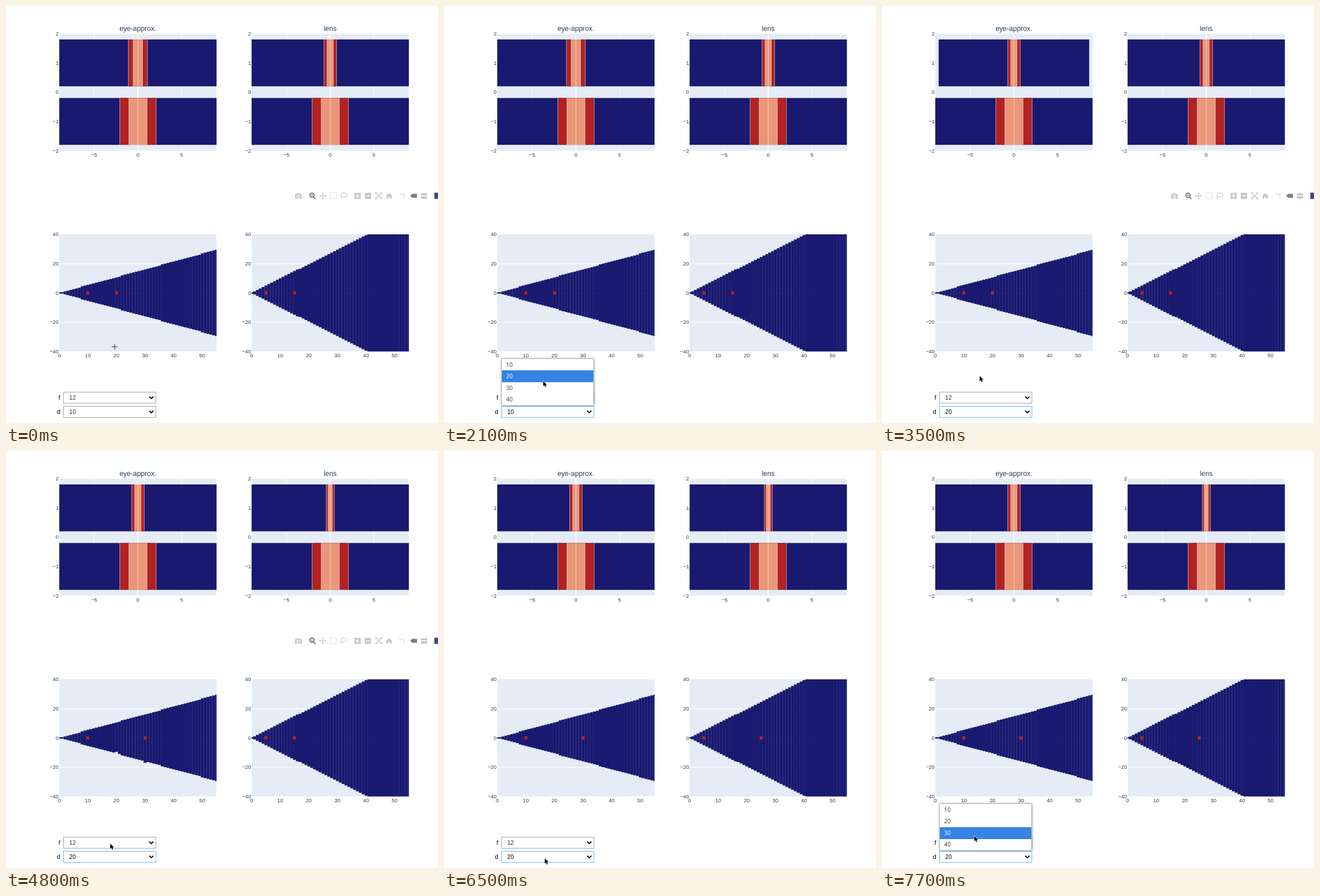
Write an HTML page with a canvas that moves like this. It is 761 by 736 pixels and loops after 8 s.

```html
<!DOCTYPE html>
<html lang="en">
<head>
<meta charset="utf-8">
<title>Eye and lens</title>
<style>
html, body { margin: 0; width: 100%; height: 100%; overflow: hidden; background: #fff; }
canvas { display: block; }
</style>
</head>
<body>
<canvas id="stage" width="761" height="736"></canvas>
<script>
const LOOP = 8000, STEP = 100;
const NAVY = '#191970', RED = '#b22222', SALMON = '#e9967a', PALE = '#e5ecf6', INK = '#2a3f5f';
const LIGHT = '#c7c7c7', DARK = '#7c7c7c', SEAM = 'rgba(229,236,246,.06)';
const LEFT = 93.8, RIGHT = 432.6, PLOT_W = 277.1, PLOT_H = 206.7;
const LIST_TOP = 623, ROW_H = 20.4;
const c = document.getElementById('stage').getContext('2d');

// Pointer stops: time, x, y
const stops = [
  [0, 191.5, 601.5], [900, 194.5, 724], [1700, 194.5, 724], [2500, 172, 653], [3900, 172, 653],
  [4800, 183.5, 693], [5300, 186, 724], [6500, 177.5, 719], [7000, 177.5, 719], [7700, 162.5, 679.5]
];
const menus = [{ open: 1500, hover: 2000, close: 3100 }, { open: 6600, hover: 7500, close: LOOP }];

const within = (t, a, b) => t >= a && t < b;
const clamp = (v, lo, hi) => Math.min(hi, Math.max(lo, v));
const ramp = (t, start) => clamp((t - start) / 300, 0, 1);
const tick = n => String(n).replace('-', '\u2212');

function pointerAt(t) {
  const i = stops.findIndex(s => s[0] > t);
  if (i < 0) return stops[stops.length - 1].slice(1);
  const [t0, x0, y0] = stops[i - 1], [t1, x1, y1] = stops[i];
  const p = 1 - (1 - (t - t0) / (t1 - t0)) ** 3;
  return [x0 + (x1 - x0) * p, y0 + (y1 - y0) * p];
}

function rect(x, y, w, h, color) {
  c.fillStyle = color;
  c.fillRect(x, y, w, h);
}

function frame(x, y, w, h, color) {
  c.strokeStyle = color;
  c.lineWidth = 1;
  c.strokeRect(x, y, w, h);
}

function text(s, x, y, align = 'center', size = 9.4, color = INK, font = 'Liberation Sans') {
  c.font = `${size}px "${font}", sans-serif`;
  c.textAlign = align;
  c.fillStyle = color;
  c.fillText(s, x, y);
}

function trace(points) {
  c.beginPath();
  points.forEach(p => c.lineTo(...p));
}

function line(points, color, width = 1.2) {
  trace(points);
  c.strokeStyle = color;
  c.lineWidth = width;
  c.stroke();
}

function shape(points, color) {
  trace(points);
  c.fillStyle = color;
  c.fill();
}

function ring(x, y, rx, ry, color, width = 1.2) {
  c.beginPath();
  c.ellipse(x, y, rx, ry, 0, 0, 7);
  c.strokeStyle = color;
  c.lineWidth = width;
  c.stroke();
}

function clipped(x, y, paint) {
  c.save();
  c.beginPath();
  c.rect(x, y, PLOT_W, PLOT_H);
  c.clip();
  rect(x, y, PLOT_W, PLOT_H, PALE);
  paint();
  c.restore();
}

// Two nested bars; red and dark are half-widths of the upper one
function barPlot(x, title, red, dark) {
  const top = 48.7, unit = PLOT_W / 18, mid = x + PLOT_W / 2, vUnit = PLOT_H / 4;
  const bar = (v, red, dark) => {
    const y = top + v * vUnit, h = 1.6 * vUnit;
    [[dark, NAVY], [red, RED], [red / 2, SALMON]].forEach(([w, color]) => {
      rect(mid - w * unit, y, 2 * w * unit, h, color);
      [-w, w].forEach(e => rect(mid + e * unit - .3, y, .6, h, PALE));
    });
    rect(mid - .4, y, .8, h, '#f6e6e4');
  };
  clipped(x, top, () => {
    [-5, 0, 5].forEach(v => rect(mid + v * unit - (v ? .5 : 1), top, v ? 1 : 2, PLOT_H, '#fff'));
    bar(.2, red, dark);
    bar(2.2, 2.08, 20);
  });
  text(title, mid, 44, 'center', 12.3);
  [-5, 0, 5].forEach(v => text(tick(v), mid + v * unit, 266));
  for (let v = -2; v <= 2; v++) text(tick(v), x - 1, top + (2 - v) * vUnit + 3.3, 'right');
}

// Cone of stacked cells with two marked columns; while moving, the lower ends lag behind
function conePlot(x, slope, marks, moving) {
  const top = 403, unit = PLOT_W / 55, vUnit = PLOT_H / 80, mid = top + PLOT_H / 2;
  clipped(x, top, () => {
    [-20, 20].forEach(v => rect(x, Math.round(mid - v * vUnit) - .5, PLOT_W, 1.2, '#fff'));
    rect(x, mid - 1, PLOT_W, 2, '#fff');
    for (let i = 0; i <= 55; i++) {
      const half = Math.max(1, Math.round(2 * slope * i)) / 2;
      const lag = moving ? (i === marks[1]) - (i === marks[1] - 10) : 0;
      const cx = x + (i - .5) * unit, y = mid - half * vUnit, h = (2 * half + lag) * vUnit;
      rect(cx, y, unit + .3, h, NAVY);
      rect(cx, y, .5, h, SEAM);
    }
    rect(x, mid - .3, PLOT_W, .6, SEAM);
    marks.forEach(m => rect(x + (m - .5) * unit, mid - 3, unit, 6, RED));
  });
  for (let v = 0; v <= 50; v += 10) text(v, x + v * unit, 620);
  for (let v = -40; v <= 40; v += 20) text(tick(v), x - 1, mid - v * vUnit + 3.3, 'right');
}

// Runs paint around (x, 335), turned in quarter steps
function icon(x, paint, turns = 1) {
  for (let i = 0; i < turns; i++) {
    c.save();
    c.translate(x, 335);
    c.rotate(i * Math.PI / 2);
    paint();
    c.restore();
  }
}

function toolbar(alpha) {
  if (alpha <= 0) return;
  c.globalAlpha = alpha;
  icon(515, () => {
    rect(-6, -3, 12, 8, LIGHT);
    rect(-3, -4.5, 6, 2, LIGHT);
    ring(0, 1, 2.3, 2.3, '#fff');
  });
  icon(539, () => {
    ring(0, -1, 3.8, 3.8, DARK, 2);
    line([[2.5, 2], [6, 5.5]], DARK, 2.2);
    rect(-2, -1.5, 4, 1, DARK);
    rect(-.5, -3, 1, 4, DARK);
  });
  icon(558, () => {
    line([[0, 0], [5, 0]], LIGHT);
    shape([[6.3, 0], [4, 2.2], [4, -2.2]], LIGHT);
  }, 4);
  c.setLineDash([2, 1.3]);
  icon(576.3, () => frame(-5.5, -5.2, 11, 10.5, LIGHT));
  icon(698, () => line([[-5, -3], [3, -3], [3, 5]], LIGHT, 1.5));
  c.setLineDash([]);
  icon(595, () => {
    ring(0, -1.5, 5.4, 3.6, LIGHT);
    line([[-4, 1], [-4.8, 3.5], [-3, 5.5]], LIGHT);
  });
  [619.3, 637.6].forEach((x, i) => icon(x, () => {
    rect(-5.5, -5.2, 11, 10.8, LIGHT);
    rect(-3.3, -.6, 6.6, 1.6, '#fff');
    if (!i) rect(-.8, -3.1, 1.6, 6.6, '#fff');
  }));
  icon(656.5, () => {
    line([[0, 0], [5, 5]], LIGHT);
    line([[2.4, 5.4], [5.4, 5.4], [5.4, 2.4]], LIGHT);
  }, 4);
  icon(675, () => {
    shape([[-6, .5], [0, -5], [6, .5]], LIGHT);
    [-4.5, 1.4].forEach(x => rect(x, 0, 3.1, 5, LIGHT));
    rect(-2, 0, 4, 2, LIGHT);
  });
  icon(718, () => shape([[-6, 0], [-2.5, -3.6], [6, -3.6], [6, 3.6], [-2.5, 3.6]], DARK));
  [-4.5, 1].forEach(y => icon(736, () => shape([[-6, y + 2], [-4, y], [6, y], [6, y + 4], [-4, y + 4]], LIGHT)));
  rect(754.5, 329.5, 11, 11, '#3b4b78');
  c.globalAlpha = 1;
}

function select(label, y, value, focus) {
  text(label, 95.5, y + 14, 'right', 11, '#000');
  frame(101.5, y + .5, 162.5, 19.7, focus ? '#64b5f6' : '#9e9e9e');
  text(value, 111.5, y + 14, 'left', 10.2, focus ? '#000' : '#333');
  line([[252.3, y + 8.3], [256, y + 12], [259.7, y + 8.3]], '#000', 1.9);
}

function list(row) {
  c.save();
  c.shadowColor = 'rgba(0,0,0,.6)';
  c.shadowBlur = 5;
  rect(101.5, LIST_TOP - .5, 162, 82.5, '#fff');
  c.restore();
  frame(101.5, LIST_TOP - .5, 162, 82.5, '#b4b4b4');
  for (let i = 0; i < 4; i++) {
    const y = Math.round(LIST_TOP + i * ROW_H);
    if (i === row) rect(102, y, 161, 21, '#3584e4');
    text((i + 1) * 10, 109.6, y + 14, 'left', 10, i === row ? '#fff' : '#333', 'Open Sans');
  }
}

function pointer(x, y) {
  if (y < 609) {
    line([[x - 5.5, y], [x + 5.5, y]], '#333', 1);
    line([[x, y - 5.5], [x, y + 5.5]], '#333', 1);
    return;
  }
  c.save();
  c.translate(x, y);
  c.lineJoin = 'round';
  trace([[0, 0], [0, 9.2], [2.1, 7.3], [3.7, 10.7], [5.3, 10], [3.8, 6.7], [6.7, 6.5]]);
  c.closePath();
  c.strokeStyle = '#fff';
  c.lineWidth = 1.2;
  c.stroke();
  c.fillStyle = '#000';
  c.fill();
  c.restore();
}

function draw(now) {
  const t = Math.floor(now % LOOP / STEP) * STEP;
  const [x, y] = pointerAt(t);
  const d = t < menus[0].close ? 10 : 20;
  const menu = menus.find(m => within(t, m.open, m.close));
  rect(0, 0, 761, 736, '#fff');
  barPlot(LEFT, 'eye-approx.', t < 3500 ? 1.08 : .72, within(t, 3500, 3700) ? 8.63 : 20);
  barPlot(RIGHT, 'lens', t < 3700 ? .72 : .46, within(t, 3700, 4000) ? 5.5 : 20);
  conePlot(LEFT, .535, [10, t < 4800 ? 20 : 30], within(t, 4800, 5000));
  conePlot(RIGHT, .985, [5, t < 5300 ? 15 : 25], within(t, 5300, 5500));
  toolbar(1 - ramp(t, 500) + ramp(t, 3000) - ramp(t, 4800));
  select('f', 681, 12, false);
  select('d', 706, d, t >= menus[0].open);
  if (menu) list(t < menu.hover ? d / 10 - 1 : clamp(Math.floor((y - LIST_TOP) / ROW_H), 0, 3));
  pointer(x, y);
  requestAnimationFrame(draw);
}
requestAnimationFrame(draw);
</script>
</body>
</html>
```
